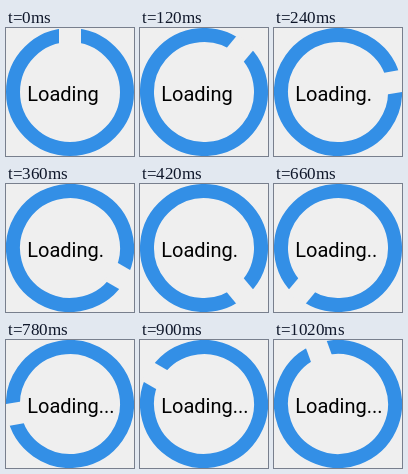
These frames come from a looping animation (128x128 px, 1080 ms). An HTML page with a canvas:

```html
<!DOCTYPE html>
<html>
<head>
<meta charset="utf-8">
<style>
html, body { margin: 0; width: 100%; height: 100%; overflow: hidden; background: #efefef; }
canvas { display: block; }
</style>
</head>
<body>
<canvas id="stage" width="128" height="128"></canvas>
<script>
const ctx = document.getElementById('stage').getContext('2d');
const SIZE = 128, MID = SIZE / 2;
const BACK = '#efefef';
const RADIUS = 57, WIDTH = 14, GAP = 22;
const STEP = 60, STEPS = 18;
const DOT_STEPS = [4, 9, 13];

function drawRing(turn) {
  ctx.save();
  ctx.translate(MID, MID);
  ctx.rotate(turn);
  ctx.strokeStyle = '#338fe6';
  ctx.lineWidth = WIDTH;
  ctx.beginPath();
  ctx.arc(0, 0, RADIUS, 0, Math.PI * 2);
  ctx.stroke();
  // straight-sided notch
  ctx.fillStyle = BACK;
  ctx.fillRect(-GAP / 2, -MID - 2, GAP, WIDTH + 6);
  ctx.restore();
}

function drawLabel(dots) {
  ctx.fillStyle = '#000';
  ctx.font = '20px Roboto, sans-serif';
  ctx.fillText('Loading' + '.'.repeat(dots), 21.2, 73);
}

function draw(ms) {
  const step = Math.floor(ms / STEP) % STEPS;
  ctx.fillStyle = BACK;
  ctx.fillRect(0, 0, SIZE, SIZE);
  drawRing(step / STEPS * Math.PI * 2);
  drawLabel(DOT_STEPS.filter(s => step >= s).length);
}

const start = performance.now();
function tick() {
  draw(performance.now() - start);
  requestAnimationFrame(tick);
}
tick();
</script>
</body>
</html>
```
